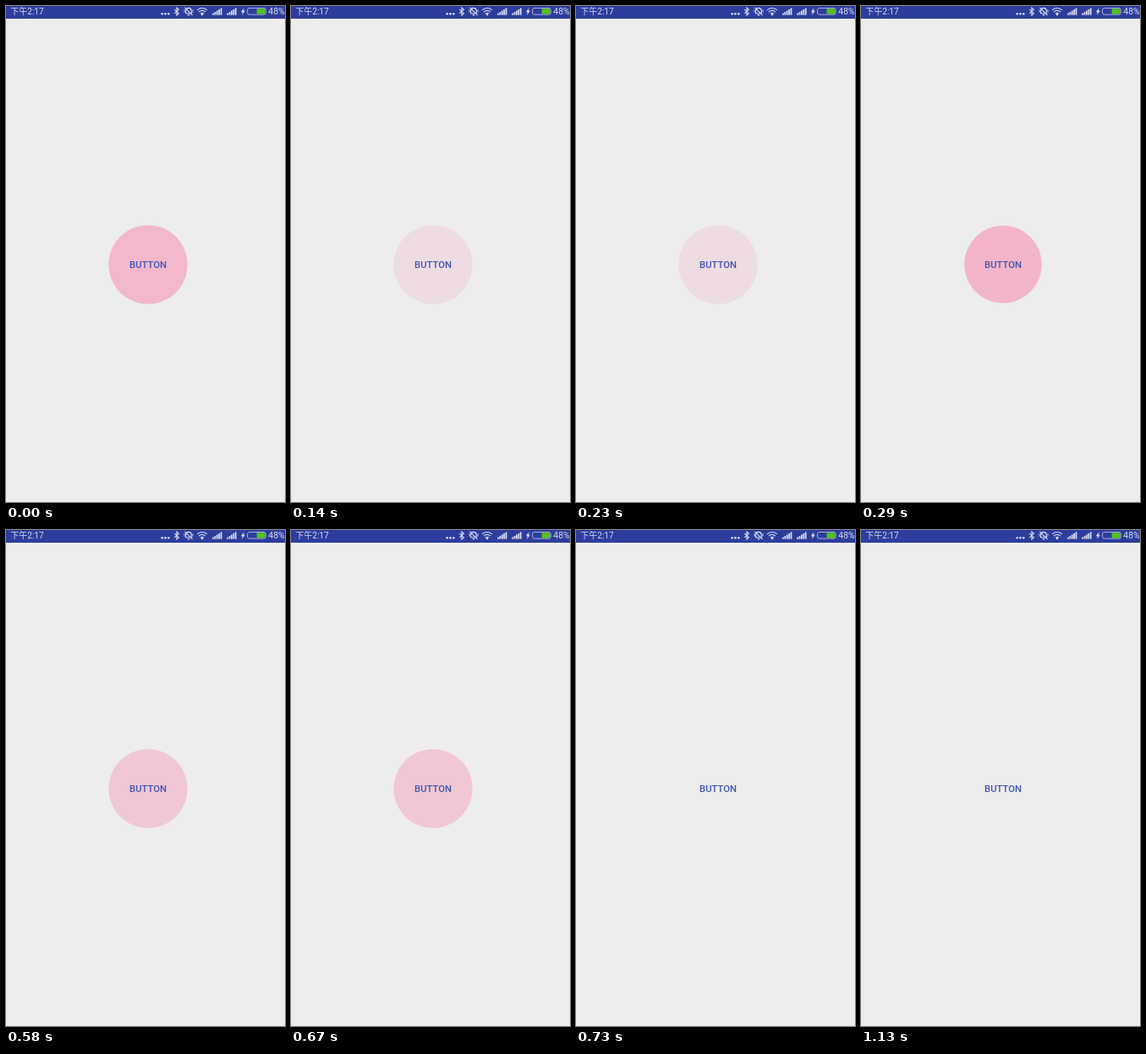
Animation, 330 px wide and 585 px high, one loop 1390 ms. Source, as an HTML page:

```html
<!DOCTYPE html>
<html lang="zh">
<head>
<meta charset="utf-8">
<title>Ripple button</title>
<style>
html, body { margin: 0; width: 100%; height: 100%; overflow: hidden; background: #ededed; }
svg { display: block; width: 100vw; height: 100vh; }
text { font-family: Roboto, "Noto Sans CJK SC", "Noto Sans CJK", sans-serif; }
</style>
</head>
<body>
<svg viewBox="0 0 330 585">
  <rect width="330" height="585" fill="#ededed"/>
  <rect width="330" height="15" fill="#2d3d9d"/>

  <g fill="#d9dcef">
    <text x="5.3" y="10.2" font-size="10">下午2:17</text>
    <text x="310.3" y="10.3" font-size="10.4">48%</text>
    <circle cx="184.7" cy="9.2" r="1.3"/>
    <circle cx="188.5" cy="9.2" r="1.3"/>
    <circle cx="192.3" cy="9.2" r="1.3"/>
    <path d="M281.6 2 277.8 7.2H279.9L279 11 282.9 5.6H280.8Z"/>
    <g id="bars"></g>
    <use href="#bars" x="17.2"/>
    <circle cx="232" cy="10" r="1.2"/>
  </g>

  <g fill="none" stroke="#d9dcef" stroke-width="1.1">
    <path d="M199.2 4.1 204.4 8.7 201.9 11V2L204.4 4.3 199.2 8.9"/>
    <path d="M226 4.9Q232 .2 238 4.9M228 7Q232 3.8 236 7M230 9Q232 7.4 234 9"/>
    <path d="M212.6 8.8V5.4Q213 2.4 216 2.4T219.3 5.4V8.8ZM214.7 10.6H217.3M211.4 1.8 220.6 10.8"/>
    <path d="M211 4.2V7.6M221 4.2V7.6" stroke-width=".9"/>
    <rect x="285.6" y="2.5" width="21.6" height="7.6" rx="2.2" stroke="#b9bfe2" stroke-width=".9"/>
  </g>
  <path d="M296.6 3.2H305.2Q306.6 3.2 306.6 4.6V8Q306.6 9.4 305.2 9.4H296.6Z" fill="#52c41e"/>

  <circle id="halo"/>
  <circle id="wave"/>
  <text x="168" y="309.1" font-size="11.3" font-weight="500" text-anchor="middle" fill="#4056b4">BUTTON</text>
</svg>
<script>
const LOOP = 1390;
const $ = id => document.getElementById(id);

// Each pose holds until the next: start, then halo and wave as [x, y, radius, colour].
const poses = [
  { at: 0,   halo: [168, 305, 46.6, '#f2b7cb'] },
  { at: 140, halo: [168, 305, 46.6, '#eddce2'] },
  { at: 290, halo: [168, 304.8, 45.7, '#f2b5c9'] },
  { at: 430, halo: [168, 305, 46.6, '#f0d0d9'], wave: [168.5, 304.5, 39.4, '#f699b6'] },
  { at: 580, halo: [168, 305, 46.6, '#f1c7d3'] },
  { at: 730 }
];

for (let i = 0; i < 5; i++) {
  const bar = document.createElementNS('http://www.w3.org/2000/svg', 'rect');
  const h = 2 + i * 1.55;
  const box = { x: 244 + i * 2.4, y: 10.6 - h, width: 1.8, height: h };
  for (const key in box) bar.setAttribute(key, box[key]);
  $('bars').append(bar);
}

function setCircle(id, [x, y, r, fill] = [168, 305, 0, 'none']) {
  const el = $(id);
  el.setAttribute('cx', x);
  el.setAttribute('cy', y);
  el.setAttribute('r', r);
  el.setAttribute('fill', fill);
}

function draw(ms) {
  const t = ms % LOOP;
  const pose = poses.filter(p => p.at <= t).pop();
  setCircle('halo', pose.halo);
  setCircle('wave', pose.wave);
}

const start = performance.now();
function tick() {
  draw(performance.now() - start);
  requestAnimationFrame(tick);
}
tick();
</script>
</body>
</html>
```
